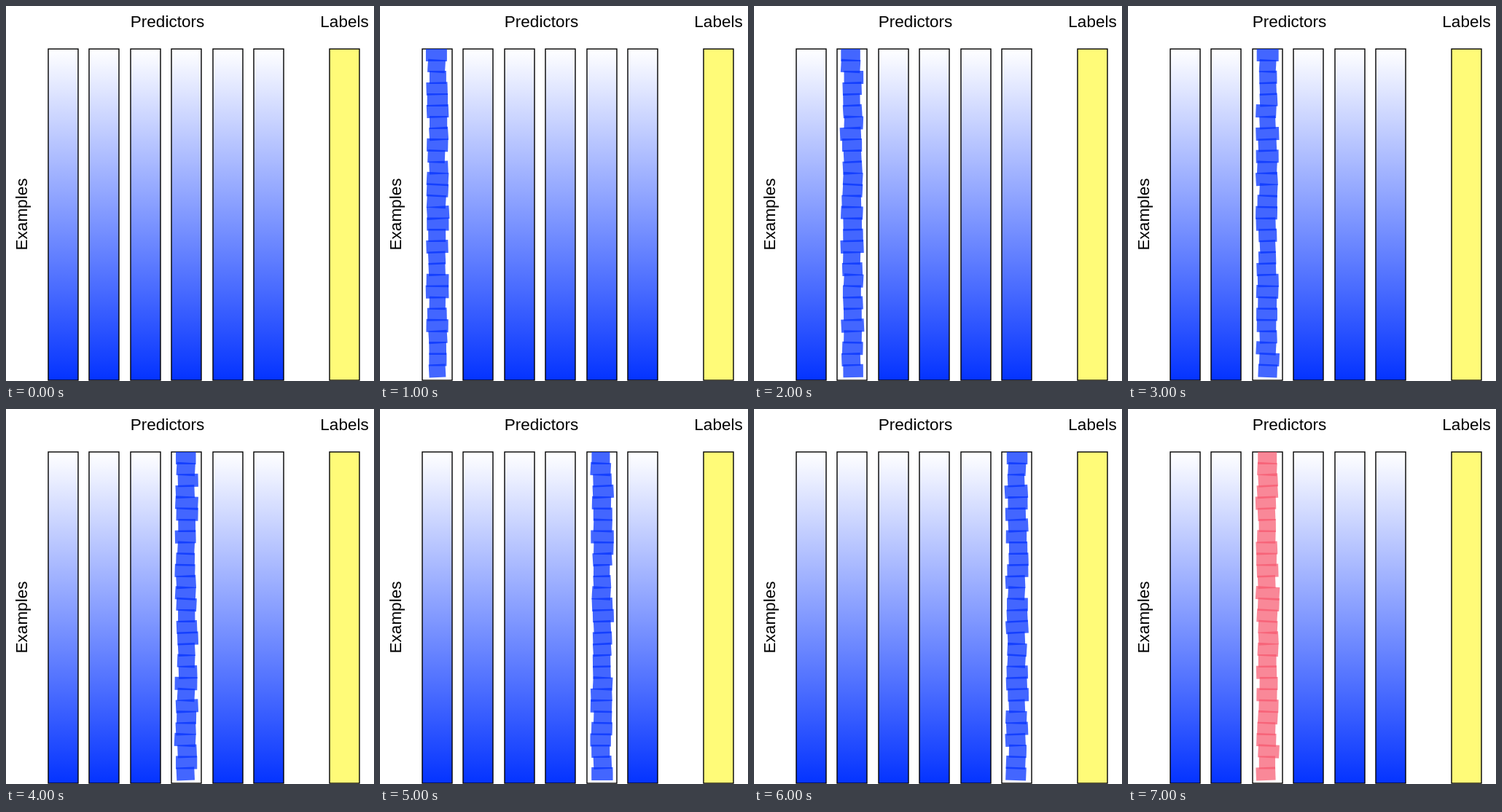
An HTML page with a canvas for the animation above (8 s loop, 505 by 515 pixels).

```html
<!DOCTYPE html>
<html lang="en">
<head>
<meta charset="utf-8">
<style>
  html, body { margin: 0; width: 100%; height: 100%; overflow: hidden; background: #fff; }
  canvas { display: block; }
</style>
</head>
<body>
<canvas id="stage" width="505" height="515"></canvas>
<script>
const ctx = document.getElementById('stage').getContext('2d');
const TOP = 59, HEIGHT = 455, WIDTH = 41;
const BLUE = 'rgba(4,51,255,0.75)', PINK = 'rgba(247,85,108,0.7)';

// One shuffled column per second; the first second shows none.
const steps = [
  null,
  ...[0, 1, 2, 3, 4, 5].map(column => ({ column, color: BLUE })),
  { column: 2, color: PINK },
];

const gradient = ctx.createLinearGradient(0, TOP, 0, TOP + HEIGHT);
gradient.addColorStop(0, '#fff');
gradient.addColorStop(1, '#0433ff');

const columnX = i => Math.round(58 + 56.4 * i);

function seeded(seed) {
  return () => {
    seed = (seed * 16807) % 2147483647;
    return seed / 2147483647;
  };
}

function label(text, x, y, angle = 0) {
  ctx.save();
  ctx.translate(x, y);
  ctx.rotate(angle);
  ctx.fillStyle = '#000';
  ctx.fillText(text, 0, 0);
  ctx.restore();
}

function bar(x, fill) {
  ctx.fillStyle = fill;
  ctx.fillRect(x, TOP, WIDTH, HEIGHT);
  ctx.strokeRect(x, TOP, WIDTH, HEIGHT);
}

// A loose stack of translucent patches, cut off at the top of the bar.
function patches(x, color, seed) {
  const random = seeded(seed * 7919 + 12345);
  ctx.save();
  ctx.beginPath();
  ctx.rect(x, TOP, WIDTH, HEIGHT);
  ctx.clip();
  ctx.fillStyle = color;
  for (let i = 0; i < 29; i++) {
    const left = 4 + 6 * random(), right = 31 + 6 * random();
    const width = right - left;
    ctx.save();
    ctx.translate(x + (left + right) / 2, 67 + 15.5 * i);
    ctx.rotate(i ? (random() - 0.5) * 0.12 : 0);
    ctx.fillRect(-width / 2, -9, width, 18);
    ctx.restore();
  }
  ctx.restore();
}

function draw(now) {
  const index = Math.floor((now % 8000) / 1000);
  const step = steps[index];
  ctx.fillStyle = '#fff';
  ctx.fillRect(0, 0, 505, 515);
  ctx.strokeStyle = '#000';
  ctx.lineWidth = 1.4;
  ctx.textAlign = 'center';
  ctx.font = '22.5px "Liberation Sans", Arial, sans-serif';
  label('Predictors', 221.5, 29);
  label('Labels', 464.5, 29);
  label('Examples', 29, 286, -Math.PI / 2);
  for (let i = 0; i < 6; i++) {
    const active = step && step.column === i;
    bar(columnX(i), active ? '#fff' : gradient);
    if (active) patches(columnX(i), step.color, index);
  }
  bar(444, '#fffb78');
  requestAnimationFrame(draw);
}
requestAnimationFrame(draw);
</script>
</body>
</html>
```
